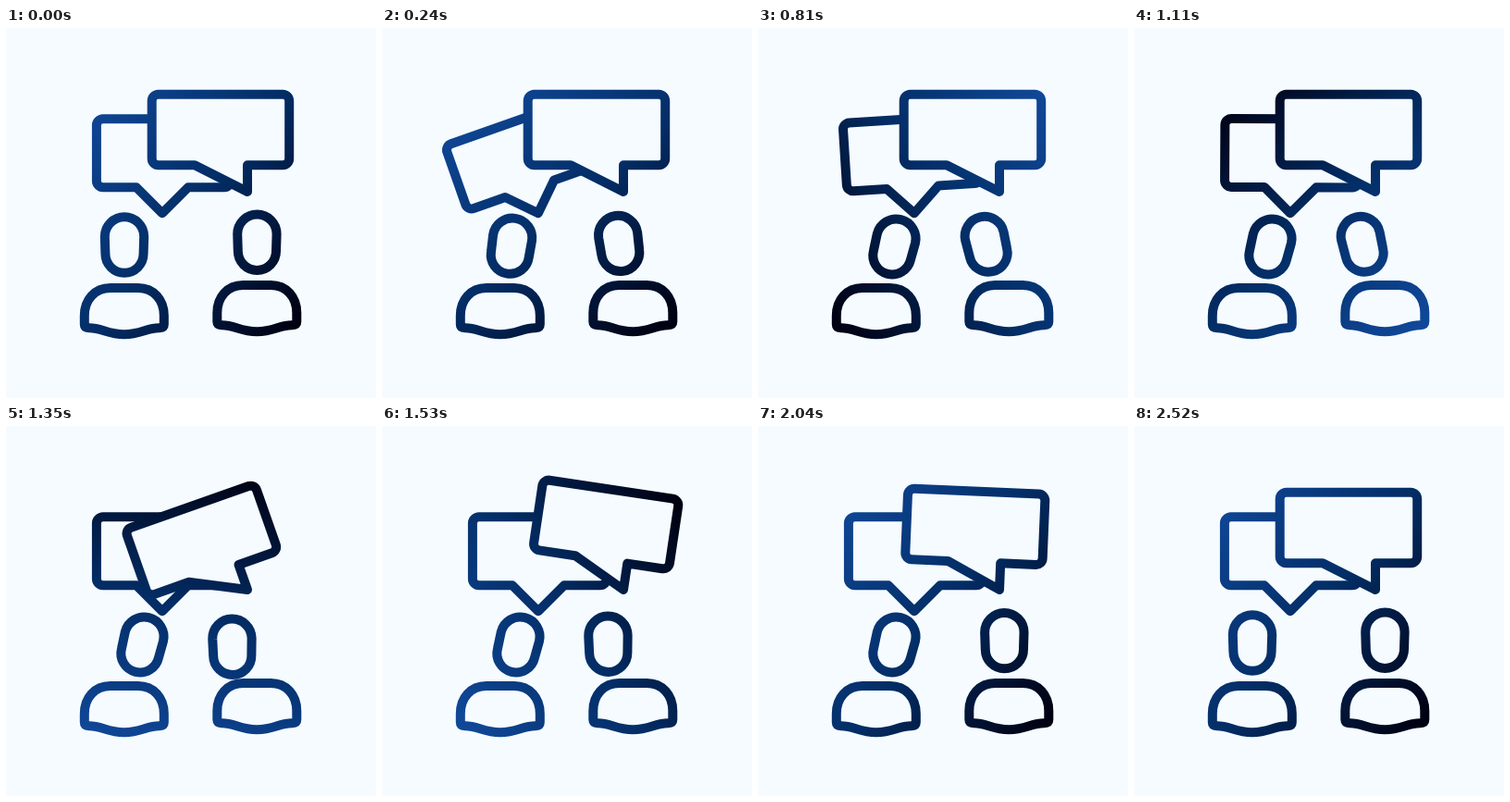
These frames come from a looping animation (400 px wide and 400 px high, 4.55 s). An HTML page with a canvas:

```html
<!DOCTYPE html>
<html lang="en">
<head>
<meta charset="utf-8">
<title>Conversation</title>
<style>
  html, body { margin: 0; width: 100%; height: 100%; overflow: hidden; background: #f5fbff; }
  canvas { display: block; width: 100vw; height: 100vh; }
</style>
</head>
<body>
<canvas id="stage"></canvas>
<script>
const LOOP = 4550, STEP = 30, MOVE_END = 2520, TURN = 2160;
const BG = '#f5fbff';
const canvas = document.getElementById('stage');
const ctx = canvas.getContext('2d');

// Speech bubble around its tail tip; the tail meets the lower edge at tailL and tailR.
function bubble(left, top, right, bottom, tailL, tailR, r = 7) {
  const p = new Path2D();
  p.moveTo(0, 0);
  p.lineTo(tailL, bottom);
  p.arcTo(left, bottom, left, top, r);
  p.arcTo(left, top, right, top, r);
  p.arcTo(right, top, right, bottom, r);
  p.arcTo(right, bottom, tailR, bottom, r);
  p.lineTo(tailR, bottom);
  p.closePath();
  return p;
}

const backBubble = bubble(-71, -102, 74, -28, -28, 28);
const frontBubble = bubble(-103.3, -105.2, 45.2, -28.7, -57, 0);
const head = new Path2D('M-21.2-9A21.2 21.2 0 0 1 21.2-9L20.6 9.6A20.6 20.6 0 0 1-20.6 9.6Z');
const body = new Path2D(
  'M-15 0H15C32 0 43 13 43 30V39.5Q43 43 38 43.3C25 43 18 50.3 0 50.3' +
  'C-18 50.3-25 43-38 43.3Q-43 43-43 39.5V30C-43 13-32 0-15 0Z');

const clamp = p => Math.min(1, Math.max(0, p));
const ease = p => 0.5 - 0.5 * Math.cos(Math.PI * clamp(p));
const ramp = (t, from, length) => ease((t - from) / length);

// Both bubbles rock with the same fading swing, in degrees.
const PEAKS = [0, -19.5, 14.5, -9.5, 2.6, 0], BEAT = 232;
function swing(t) {
  const p = Math.max(0, t / BEAT), i = Math.floor(p);
  if (i >= PEAKS.length - 1) return 0;
  return PEAKS[i] + (PEAKS[i + 1] - PEAKS[i]) * ease(p - i);
}

function leftHead(t) {
  const lean = ramp(t, 0, 420) - ramp(t, 2130, 370);
  return [128 + 19.2 * lean, 234.5 + 2 * lean, 13.8 * lean];
}

function rightHead(t) {
  const lean = ramp(t, 0, 420) - ramp(t, 1740, 420);
  const upright = ramp(t, 1110, 240);
  const dip = Math.sin(Math.PI * clamp((t - 1110) / 480));
  return [
    271.4 - (24.5 + 2.3 * upright) * lean,
    231.7 + 2.1 * lean + 5 * dip,
    (12 * upright - 13) * lean
  ];
}

// Placing the path first keeps the gradient fixed to the stage.
function draw(shape, x, y, angle = 0, filled = false) {
  const path = new Path2D();
  path.addPath(shape, new DOMMatrix().translate(x, y).rotate(angle));
  if (filled) ctx.fill(path);
  ctx.stroke(path);
}

function ink(t) {
  const a = Math.PI * (0.21 + 2 * ease(t / TURN));
  const dx = 165 * Math.cos(a), dy = 165 * Math.sin(a);
  const g = ctx.createLinearGradient(200 - dx, 200 - dy, 200 + dx, 200 + dy);
  g.addColorStop(0, '#104899');
  g.addColorStop(0.5, '#032d65');
  g.addColorStop(1, '#000010');
  return g;
}

function render(t) {
  const ratio = window.devicePixelRatio || 1;
  const w = Math.round(innerWidth * ratio), h = Math.round(innerHeight * ratio);
  if (canvas.width !== w || canvas.height !== h) {
    canvas.width = w;
    canvas.height = h;
  }
  ctx.setTransform(1, 0, 0, 1, 0, 0);
  ctx.fillStyle = BG;
  ctx.fillRect(0, 0, w, h);
  const s = Math.min(w, h) / 400;
  ctx.setTransform(s, 0, 0, s, (w - 400 * s) / 2, (h - 400 * s) / 2);

  ctx.strokeStyle = ink(t);
  ctx.lineWidth = 10;
  ctx.lineJoin = 'round';

  draw(backBubble, 168.9, 200.2, swing(t));
  draw(frontBubble, 261, 177, swing(t - 1130), true);
  draw(body, 127.8, 280.9);
  draw(body, 271.3, 278);
  draw(head, ...leftHead(t));
  draw(head, ...rightHead(t));
}

const start = performance.now();
function tick() {
  const t = (performance.now() - start) % LOOP;
  render(Math.min(MOVE_END, Math.floor(t / STEP) * STEP));
  requestAnimationFrame(tick);
}
tick();
</script>
</body>
</html>
```
